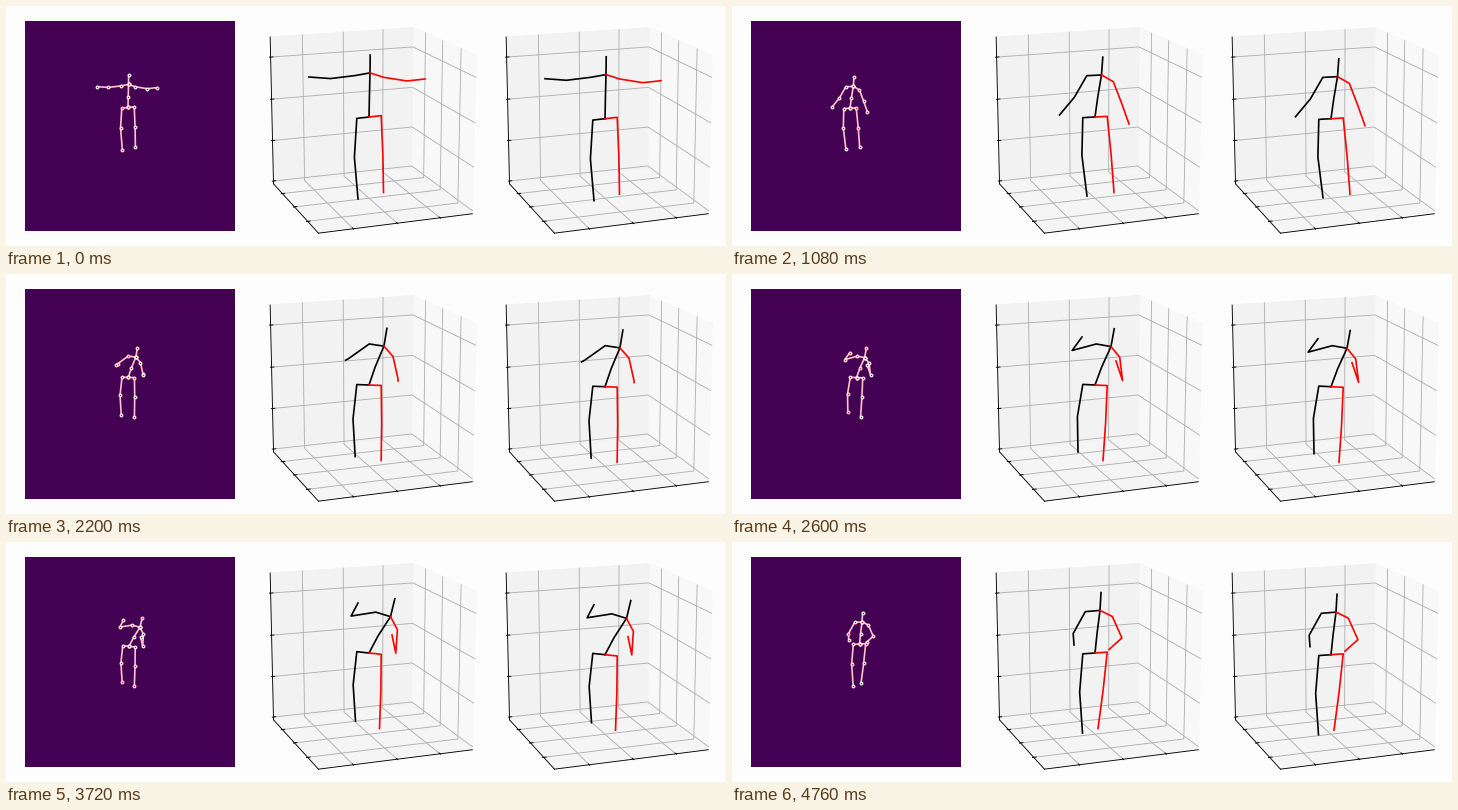
A matplotlib script that plays this animation: 720 px wide and 240 px high, repeating every 4800 ms.

```python
import numpy as np
import matplotlib.pyplot as plt
from matplotlib.animation import FuncAnimation

W, H, DPI = 720, 240, 80
FRAMES, STEP = 120, 40
PAPER, PINK, GRID = "#fdfdfd", "pink", "#b0b0b0"
PANEL_GAP = 236
PELVIS = np.array([363, 111])

# The few values that drive the body, at the key times: sideways lean, upper
# arm angles, hands and feet, and the hips' place in the flat view.
KEY_MS = np.array([0, 600, 1080, 1840, 2600, 3720, 4760.])
DRIVE = {
    "lean": [1, 2, 6.5, 13.5, 16, 21.5, 5],
    "left_angle": [173, 131, 120, 127, 165, 171, 119],
    "left_x": [303, 316.5, 327.5, 330.5, 350, 352, 342],
    "left_y": [71, 98, 109, 106, 63, 61, 103],
    "right_angle": [9, 44, 69, 73, 83, 94, 66],
    "right_x": [419, 405, 397, 399, 384, 386, 377],
    "right_y": [73, 96, 118, 124, 87, 93, 107.5],
    "left_foot_x": [352, 348.5, 355, 353, 346, 349.5, 350.5],
    "left_foot_y": [193, 192, 190, 188, 178, 179, 191],
    "right_foot_x": [377.5, 379, 382, 380, 371, 373.5, 366],
    "flat_x": [122, 121, 118, 119.5, 124.5, 123, 127.5],
}
KEYS = np.array(list(DRIVE.values())).T
SECANTS = np.diff(KEYS, axis=0) / np.diff(KEY_MS)[:, None]
SLOPES = np.gradient(KEYS, KEY_MS, axis=0)
SLOPES[1:-1][SECANTS[1:] * SECANTS[:-1] <= 0] = 0


def drive(ms):
    """Smooth curve through the key values, without overshoot at turns."""
    i = min(np.searchsorted(KEY_MS, ms, side="right"), len(KEY_MS) - 1) - 1
    span = KEY_MS[i + 1] - KEY_MS[i]
    s = (ms - KEY_MS[i]) / span
    ease = s * s * (3 - 2 * s)
    bend = s * (1 - s) * span * ((1 - s) * SLOPES[i] - s * SLOPES[i + 1])
    return dict(zip(DRIVE, KEYS[i] + ease * (KEYS[i + 1] - KEYS[i]) + bend))


def step(start, degrees, length):
    a = np.radians(degrees)
    return start + length * np.array([np.cos(a), np.sin(a)])


def pose(v):
    """Chains of joints, worked out from the driving values."""
    lean = v["lean"]
    neck = np.array([363 + lean, 66.5 + 0.38 * lean])
    head = neck + (0.2 * lean, -17.8)
    spine = PELVIS + (neck - PELVIS) * (0.42, 0.47)

    left_shoulder = neck + (-14.7, 3 - 0.35 * lean)
    right_shoulder = neck + (14 - 0.33 * lean, 4 + 0.42 * lean)
    left_elbow = step(left_shoulder, v["left_angle"], 25)
    right_elbow = step(right_shoulder, v["right_angle"], 23.5)

    tilt = np.array([12.2, 0.13 * lean - 1.5])
    left_hip, right_hip = PELVIS - tilt, PELVIS + tilt
    left_foot = np.array([v["left_foot_x"], v["left_foot_y"]])
    right_foot = np.array([v["right_foot_x"], 186.5])
    left_knee = (left_hip + left_foot) / 2 + (-3, -1.5)
    right_knee = (right_hip + right_foot) / 2 + (0.5, 0)

    return {
        "torso": np.array([head, neck, spine, PELVIS]),
        "left arm": np.array([neck, left_shoulder, left_elbow, (v["left_x"], v["left_y"])]),
        "right arm": np.array([neck, right_shoulder, right_elbow, (v["right_x"], v["right_y"])]),
        "left leg": np.array([PELVIS, left_hip, left_knee, left_foot]),
        "right leg": np.array([PELVIS, right_hip, right_knee, right_foot]),
    }


# Perspective view of the unit cube centred on the origin
AZIM, ELEV, DIST = np.radians(70), np.radians(15), 7.5
EYE = np.array([np.cos(AZIM) * np.cos(ELEV), np.sin(AZIM) * np.cos(ELEV), np.sin(ELEV)])
RIGHT = np.array([-np.sin(AZIM), np.cos(AZIM), 0])
UP = np.cross(EYE, RIGHT)
SCALE = 210 / 0.185
CENTRE = 363, 117.4
EDGE = 0.5 + 1 / 48


def project(points):
    p = np.array(points, float)
    depth = DIST - p @ EYE
    return (CENTRE[0] + SCALE * (p @ RIGHT) / depth,
            CENTRE[1] - SCALE * (p @ UP) / depth)


def draw_room(ax, dx):
    e = EDGE
    out, inn = e + 0.1 / 12, e - 0.2 / 12

    def line(color, *points):
        x, y = project(points)
        ax.plot(x + dx, y, color=color, lw=0.8, zorder=2 if color == "black" else 1)

    def pane(color, *points):
        x, y = project(points)
        ax.fill(x + dx, y, color=color, lw=0.8, zorder=0)

    pane("#f8f8f8", (-e, -e, -e), (-e, e, -e), (-e, e, e), (-e, -e, e))
    pane("#f2f2f2", (-e, -e, -e), (e, -e, -e), (e, -e, e), (-e, -e, e))
    pane("#f5f5f5", (-e, -e, -e), (e, -e, -e), (e, e, -e), (-e, e, -e))

    for v in np.array([-0.5, 0, 0.5]) / 1.7:
        line(GRID, (v, e, -e), (v, -e, -e), (v, -e, e))
        line(GRID, (e, v, -e), (-e, v, -e), (-e, v, e))
        line("black", (v, out, -e), (v, inn, -e))
        line("black", (out, v, -e), (inn, v, -e))
    for v in np.array([0, 0.5, 1, 1.5]) / 1.7 - 0.5:
        line(GRID, (e, -e, v), (-e, -e, v), (-e, e, v))
        line("black", (out, -e, v), (inn, -e, v))
    line("black", (e, -e, e), (e, -e, -e))
    line("black", (e, -e, -e), (e, e, -e))
    line("black", (e, e, -e), (-e, e, -e))


fig = plt.figure(figsize=(W / DPI, H / DPI), dpi=DPI, facecolor=PAPER)
ax = fig.add_axes([0, 0, 1, 1])
ax.set_xlim(0, W)
ax.set_ylim(H, 0)
ax.axis("off")
ax.add_patch(plt.Rectangle((19, 15), 210, 210, color="#440154", lw=0))
draw_room(ax, 0)
draw_room(ax, PANEL_GAP)


def make_bones(panel):
    bones = {}
    for name in pose(drive(0)):
        color = "red" if name.startswith("right") else "black"
        bones[name], = ax.plot([], [], color=color if panel else PINK, lw=1.5, zorder=5)
    return bones


panels = [make_bones(i) for i in range(3)]
dots = ax.scatter([], [], 6, color="red", edgecolors="white", linewidths=1, zorder=10)


def update(frame):
    v = drive(frame * STEP)
    body = pose(v)
    hips = np.array([v["flat_x"], 101.3 + 0.14 * v["lean"]])
    flat = {name: hips + (pts - PELVIS) * (0.51, 0.52) for name, pts in body.items()}
    second = {name: pts + (PANEL_GAP, 1.7) for name, pts in body.items()}
    for bones, shape in zip(panels, (flat, body, second)):
        for name, pts in shape.items():
            bones[name].set_data(pts.T)
    dots.set_offsets(np.vstack(list(flat.values())))
    return [dots]


anim = FuncAnimation(fig, update, frames=FRAMES, interval=STEP, repeat=True,
                     repeat_delay=0, blit=False)
plt.show()
```
